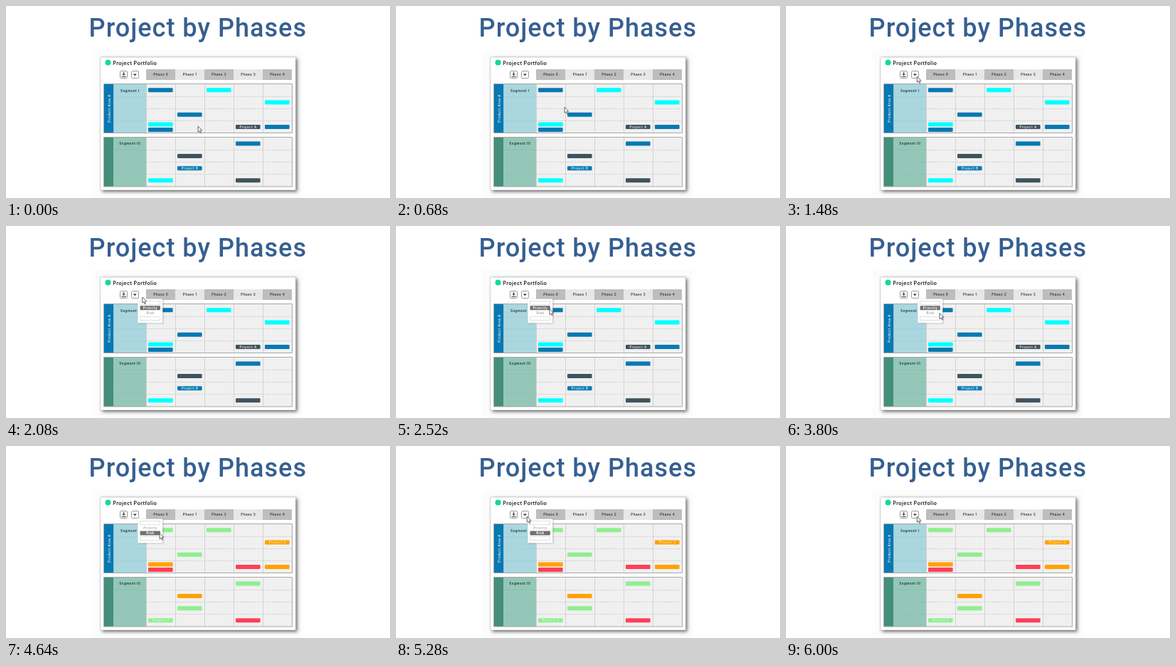
An HTML page with a canvas for the animation above (6280 ms loop, 540 by 270 pixels).

```html
<!DOCTYPE html>
<html lang="en">
<head>
<meta charset="utf-8">
<title>Project by Phases</title>
<style>
html, body { margin: 0; width: 100%; height: 100%; overflow: hidden; background: #fff; }
canvas { display: block; width: 540px; height: 270px; }
</style>
</head>
<body>
<canvas id="stage"></canvas>
<script>
const LOOP = 6280;
const canvas = document.getElementById('stage');
const ctx = canvas.getContext('2d');
const ratio = window.devicePixelRatio || 1;
canvas.width = 540 * ratio;
canvas.height = 270 * ratio;

const BLUE = '#0878b2', CYAN = '#00ffff', SLATE = '#40535d';
const GREEN = '#90ee90', ORANGE = '#ffa200', RED = '#ff3f58';
const COLUMN = 41, GRID_LEFT = 197, GRID_RIGHT = 402;
const LABEL = 4.6;

// phase, top, priority colour, risk colour, priority label, risk label
const bars = [
  [0, 115.3, BLUE, GREEN],
  [2, 115.3, CYAN, GREEN],
  [4, 132.4, CYAN, ORANGE, '', 'Project 2'],
  [1, 149.8, BLUE, GREEN],
  [0, 163.5, CYAN, ORANGE],
  [0, 171, BLUE, RED],
  [3, 167, SLATE, RED, 'Project A'],
  [4, 167, BLUE, ORANGE],
  [3, 190.6, BLUE, GREEN],
  [1, 208, SLATE, ORANGE],
  [1, 225.2, BLUE, GREEN, 'Project B'],
  [0, 242.2, CYAN, GREEN, '', 'Project 2'],
  [3, 242.2, SLATE, RED]
];

// start, end, from, to, vertical bend
const moves = [
  [370, 1080, [270, 169], [184.3, 99], 1],
  [1865, 2480, [184.3, 99], [216, 116.5], 2],
  [3360, 3760, [216, 116.5], [216, 122.5], 1],
  [4800, 5270, [216, 122.5], [184.3, 99], 1]
];

const progress = (t, a, b) => Math.min(1, Math.max(0, (t - a) / (b - a)));
const ease = p => p * p * p * (10 - 15 * p + 6 * p * p);
const mix = (a, b, p) => a + (b - a) * p;

function box(x, y, w, h, fill, stroke, radius = 0) {
  ctx.beginPath();
  ctx.roundRect(x, y, w, h, radius);
  if (fill) { ctx.fillStyle = fill; ctx.fill(); }
  if (stroke) { ctx.strokeStyle = stroke; ctx.lineWidth = 1; ctx.stroke(); }
}

function text(str, x, y, size, color, weight = 500, align = 'center', family = 'Inter', tracking = 0.1) {
  ctx.font = `${weight} ${size}px ${family}, sans-serif`;
  ctx.letterSpacing = `${size * tracking}px`;
  ctx.textAlign = align;
  ctx.fillStyle = color;
  ctx.fillText(str, x, y);
}

function line(x1, y1, x2, y2, color, width = 1, dash = []) {
  ctx.setLineDash(dash);
  ctx.strokeStyle = color;
  ctx.lineWidth = width;
  ctx.beginPath();
  ctx.moveTo(x1, y1);
  ctx.lineTo(x2, y2);
  ctx.stroke();
  ctx.setLineDash([]);
}

function polygon(points, fill) {
  ctx.beginPath();
  points.forEach(([x, y]) => ctx.lineTo(x, y));
  ctx.closePath();
  ctx.fillStyle = fill;
  ctx.fill();
}

function shadowed(color, blur, offset, paint) {
  ctx.save();
  ctx.shadowColor = color;
  ctx.shadowBlur = blur * ratio;
  ctx.shadowOffsetX = ctx.shadowOffsetY = offset * ratio;
  paint();
  ctx.restore();
}

function drawSlide() {
  box(122, 62, 295, 208, '#fcfcfc');
  shadowed('rgba(0,0,0,0.6)', 5, 2, () => box(132.7, 72, 274.8, 187, '#fff'));
  box(132.7, 72, 274.8, 187, null, 'rgba(0,0,0,0.14)');
  text('Project by Phases', 269.8, 43, 36, '#365f91', 500, 'center', 'Roboto', 0.028);

  ctx.beginPath();
  ctx.arc(143.5, 79.6, 4, 0, 7);
  ctx.fillStyle = '#14d8a4';
  ctx.fill();
  text('Project Portfolio', 150.3, 83.4, 7.2, '#222', 600, 'left', 'Inter', 0.05);
}

function drawButtons() {
  for (const x of [160.5, 176.5]) box(x, 91.5, 10, 10, '#fff', '#9a9a9a', 1);
  line(165.6, 93, 165.6, 96, '#444', 1.2);
  polygon([[163.3, 95.6], [167.9, 95.6], [165.6, 98]], '#444');
  line(162.5, 99.3, 168.8, 99.3, '#444', 1.1);
  polygon([[178.8, 95.5], [183.8, 95.5], [181.3, 98.2]], '#333');
}

function drawTable(top, height, dark, light, label, labelY) {
  box(138, top, 13.5, height, dark);
  box(151.5, top, GRID_LEFT - 151.5, height, light);
  box(GRID_LEFT, top, GRID_RIGHT - GRID_LEFT, height, '#f0f0f0');
  for (let row = 1; row < 4; row++) {
    const y = Math.floor(top + height * row / 4) + 0.5;
    line(152, y, GRID_LEFT, y, 'rgba(90,120,125,0.15)', 1, [1, 1]);
    line(GRID_LEFT, y, GRID_RIGHT, y, '#d2d2d2', 1, [2, 1]);
  }
  for (let col = 0; col < 5; col++) {
    const x = GRID_LEFT + col * COLUMN + 0.5;
    line(x, top, x, top + height, '#d2d2d2');
  }
  box(137.5, top - 0.5, GRID_RIGHT - 137, height + 0.5, null, '#a6a6a6');
  text(label, 174.2, labelY, LABEL, '#1c2f36', 600);
}

function drawBars(risk) {
  const color = risk ? 3 : 2, label = risk ? 5 : 4;
  for (const bar of bars) {
    const x = 200 + bar[0] * COLUMN, y = bar[1];
    box(x, y, 34.6, 6, bar[color], null, 1.2);
    if (bar[label]) {
      text(bar[label], x + 17.6, y + 4.7, LABEL, risk ? 'rgba(255,255,255,0.75)' : '#fff');
    }
  }
}

function drawOption(label, y, selected) {
  if (selected) box(188.5, y - 3, 28.3, 6, '#707070');
  text(label, 203, y + 1.7, LABEL, selected ? '#fff' : '#999', selected ? 700 : 500);
}

function drawMenu(risk) {
  shadowed('rgba(0,0,0,0.3)', 2, 0.5, () => box(185.3, 102.5, 35, 34, '#fff'));
  box(188.5, 105.5, 28, 5, '#fff', '#e0e0e0');
  box(188.5, 127.5, 28, 5, '#fff', '#e0e0e0');
  drawOption('Priority', 115.2, !risk);
  drawOption('Risk', 122.5, risk);
}

function drawCursor(t) {
  let x = 270, y = 169;
  for (const [start, end, from, to, bend] of moves) {
    if (t < start) break;
    const p = ease(progress(t, start, end));
    x = mix(from[0], to[0], p);
    y = mix(from[1], to[1], p ** bend);
  }
  const shape = [[0, 0], [0, 8.2], [1.8, 6.6], [3.2, 9.6], [4.6, 9], [3.3, 6.1], [5.7, 6]];
  polygon(shape.map(([dx, dy]) => [x + dx, y + dy]), '#fff');
  ctx.strokeStyle = '#555';
  ctx.lineWidth = 0.9;
  ctx.lineJoin = 'round';
  ctx.stroke();
}

function drawView(t, risk) {
  drawBars(risk);
  const open = progress(t, 1660, 1900) - progress(t, 5760, 6000);
  if (open <= 0) return;
  ctx.save();
  ctx.beginPath();
  ctx.rect(183, 100, 40, 39 * open);
  ctx.clip();
  drawMenu(risk);
  ctx.restore();
}

function draw(t) {
  ctx.setTransform(ratio, 0, 0, ratio, 0, 0);
  box(0, 0, 540, 270, '#fff');
  drawSlide();
  drawButtons();

  for (let i = 0; i < 5; i++) {
    const x = GRID_LEFT + i * COLUMN;
    box(x, 89, COLUMN, 15, i % 2 ? '#e7e7e7' : '#bdbdbd');
    text(`Phase ${i}`, x + 20.7, 98, LABEL, '#333', 600);
  }
  drawTable(110, 68.5, BLUE, '#aad7df', 'Segment I', 120.6);
  drawTable(185, 69, '#438f79', '#94c7b7', 'Segment III', 195.4);
  ctx.save();
  ctx.translate(146.6, 144);
  ctx.rotate(-Math.PI / 2);
  text('Product Area A', 0, 0, LABEL, '#fff');
  ctx.restore();

  const fade = progress(t, 3800, 4080);
  if (fade < 1) drawView(t, false);
  if (fade > 0) {
    ctx.globalAlpha = fade;
    drawView(t, true);
    ctx.globalAlpha = 1;
  }
  drawCursor(t);
}

const begin = performance.now();
function tick() {
  draw((performance.now() - begin) % LOOP);
  requestAnimationFrame(tick);
}
tick();
</script>
</body>
</html>
```
